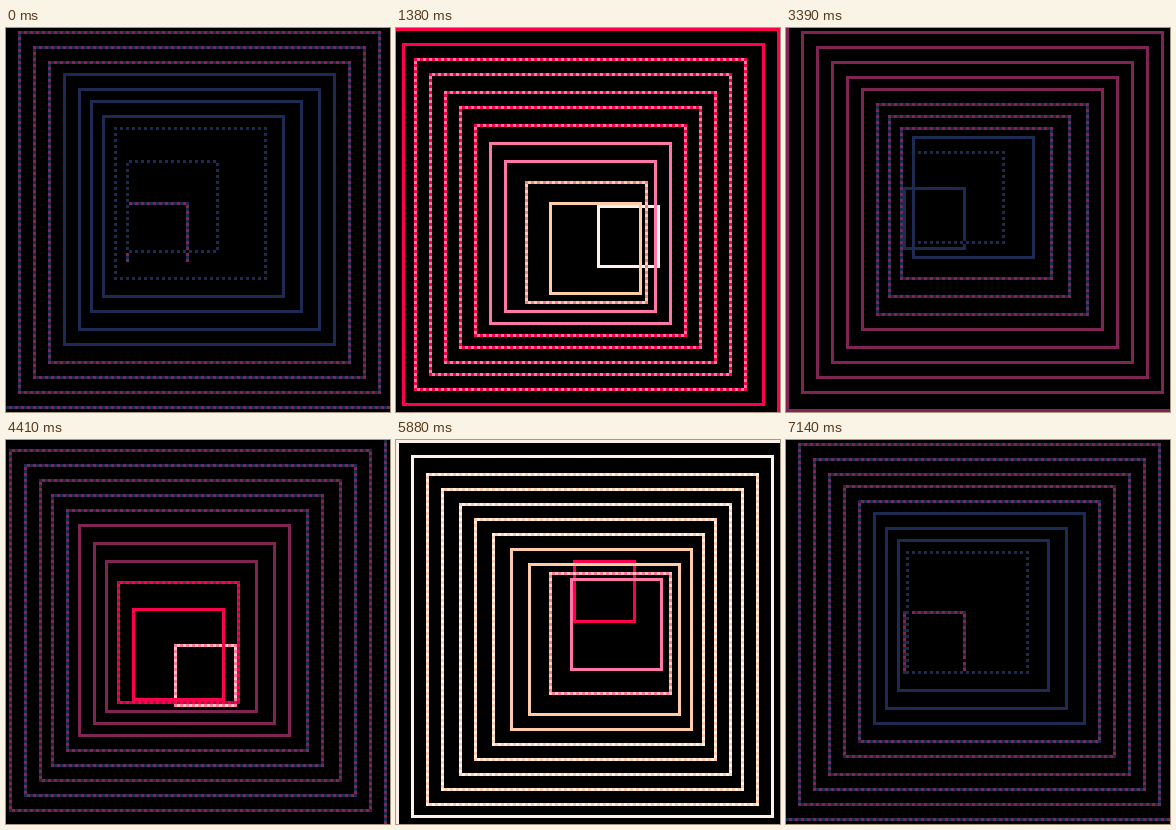
These frames come from a looping animation (384 by 384 pixels, 7170 ms). An HTML page with a canvas:

```html
<!DOCTYPE html>
<html lang="en">
<head>
<meta charset="utf-8">
<title>Square tunnel</title>
<style>
  html, body { margin: 0; width: 100%; height: 100%; overflow: hidden; background: #000; }
  canvas { display: block; width: 100vw; height: 100vh; image-rendering: pixelated; }
</style>
</head>
<body>
<canvas id="stage" width="384" height="384"></canvas>
<script>
const ctx = document.getElementById('stage').getContext('2d');
const GRID = 128, CENTER = 64;
const STEP_MS = 30, LOOP_STEPS = 239;
const CYCLE = 120; // steps per turn, and per sweep through the ramp and back
const RAMP = ['#000000', '#1d2b53', '#7e2553', '#ff004d', '#ff77a8', '#ffccaa', '#fff1e8'];

ctx.scale(384 / GRID, 384 / GRID);

const mod = (a, n) => ((a % n) + n) % n;

// Even half-levels are solid; odd ones checker two neighbouring colours.
function halfLevel(step, size) {
  const phase = mod(step - 139.5 + 700 / size, CYCLE);
  return Math.round(Math.min(phase, CYCLE - phase) / 5);
}

function plot(x, y, dark, light) {
  if (x < 0 || y < 0 || x >= GRID || y >= GRID) return;
  ctx.fillStyle = (x + y) % 2 ? light : dark;
  ctx.fillRect(x, y, 1, 1);
}

function drawSquare(step, size) {
  const angle = (306 - 3 * step - 2880 / size) * Math.PI / 180;
  const radius = 290 / size;
  const left = Math.floor(CENTER + radius * Math.cos(angle) - size / 2);
  const top = Math.floor(CENTER + radius * Math.sin(angle) - size / 2);
  const level = halfLevel(step, size);
  const dark = RAMP[Math.floor(level / 2)];
  const light = RAMP[Math.ceil(level / 2)];
  for (let i = 0; i <= size; i++) {
    plot(left + i, top, dark, light);
    plot(left + i, top + size, dark, light);
    plot(left, top + i, dark, light);
    plot(left + size, top + i, dark, light);
  }
}

function render(step) {
  ctx.fillStyle = '#000';
  ctx.fillRect(0, 0, GRID, GRID);
  for (let size = 20; size <= 130; size += 10) drawSquare(step, size);
}

const start = performance.now();
let shown = -1;

function tick() {
  const step = Math.floor((performance.now() - start) / STEP_MS) % LOOP_STEPS;
  if (step !== shown) render(shown = step);
  requestAnimationFrame(tick);
}
tick();
</script>
</body>
</html>
```
